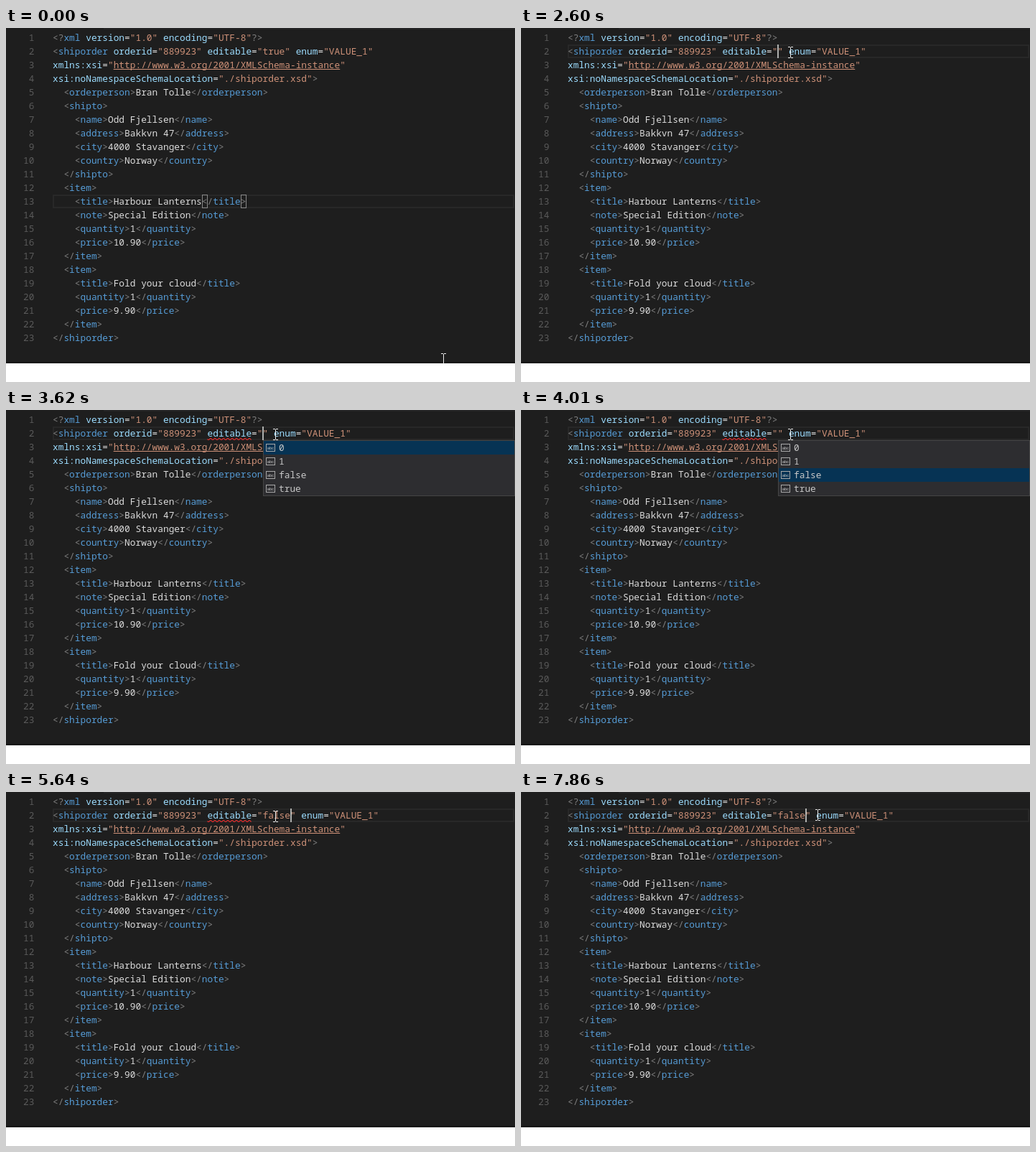
Recreate the animation shown at these times as an HTML page with a canvas. Size 709 px wide and 493 px high, loop 8 s.

```html
<!DOCTYPE html>
<html lang="en">
<head>
<meta charset="utf-8">
<style>
  html, body { margin: 0; width: 100%; height: 100%; overflow: hidden; background: #fff; }
  canvas { display: block; }
</style>
</head>
<body>
<canvas id="stage" width="709" height="493"></canvas>
<script>
const ctx = document.getElementById("stage").getContext("2d");
const WIDTH = 709, HEIGHT = 493, EDITOR_HEIGHT = 467;
const LOOP = 8000, TICK = 201.5, BLINK = 500;
const LEFT = 65, CHAR = 7.697, LINE = 19, VALUE_COL = 38;
const FONT = '500 12.83px "Noto Sans Mono", "DejaVu Sans Mono", monospace';
const COLORS = {
  string: "#ce9178", punct: "#808080", tag: "#569cd6",
  attr: "#9cdcfe", plain: "#dcdcdc"
};
const TOKEN = /(?<string>"[^"]*")|(?<punct><[\/?]?|\??>)|(?<tag>(?<=<[\/?]?)\w+)|(?<attr>[\w:]+(?==))|(?<plain> +|=|[^<>]+)/g;
const OPTIONS = ["0", "1", "false", "true"];

// Times of the user's actions; each one restarts the caret blink.
const CLICK = 1300, SELECT = 1650, DELETE = 2480, ACCEPT = 4516;
const POPUP = 2700, BROWSE = 3500, VALIDATED = 6100;

const source = value => `<?xml version="1.0" encoding="UTF-8"?>
<shiporder orderid="889923" editable="${value}" enum="VALUE_1"
xmlns:xsi="http://www.w3.org/2001/XMLSchema-instance"
xsi:noNamespaceSchemaLocation="./shiporder.xsd">
  <orderperson>Bran Tolle</orderperson>
  <shipto>
    <name>Odd Fjellsen</name>
    <address>Bakkvn 47</address>
    <city>4000 Stavanger</city>
    <country>Norway</country>
  </shipto>
  <item>
    <title>Harbour Lanterns</title>
    <note>Special Edition</note>
    <quantity>1</quantity>
    <price>10.90</price>
  </item>
  <item>
    <title>Fold your cloud</title>
    <quantity>1</quantity>
    <price>9.90</price>
  </item>
</shiporder>`.split("\n");

const colX = col => LEFT + col * CHAR;
const lineY = line => 4 + (line - 1) * LINE;
const clamp = (x, low = 0, high = 1) => Math.min(high, Math.max(low, x));
const mix = (a, b, p) => a + (b - a) * p;
const smooth = p => p * p * (3 - 2 * p);
const backOut = p => 1 + 2.7 * (p - 1) ** 3 + 1.7 * (p - 1) ** 2;

function rect(color, x, y, w, h) {
  ctx.fillStyle = color;
  ctx.fillRect(x, y, w, h);
}

function frame(color, x, y, w, h, weight = 1) {
  ctx.strokeStyle = color;
  ctx.lineWidth = weight;
  ctx.strokeRect(x + weight / 2, y + weight / 2, w - weight, h - weight);
}

function text(string, x, y, color, align = "left", font = FONT) {
  ctx.font = font;
  ctx.textAlign = align;
  ctx.fillStyle = color;
  ctx.fillText(string, x, y);
}

function drawLine(content, index) {
  const line = index + 1, base = lineY(line) + 14;
  text(line, 39.5, base, "#5a5a5a", "right");
  for (const match of content.matchAll(TOKEN)) {
    const kind = Object.keys(COLORS).find(key => match.groups[key] !== undefined);
    const token = match[0], x = colX(match.index);
    text(token, x, base, COLORS[kind]);
    if (token.startsWith('"http'))
      rect(COLORS.string, x + CHAR, base + 1, (token.length - 2) * CHAR, 1);
  }
}

function drawSquiggle() {
  ctx.beginPath();
  for (let x = 0; x <= 8 * CHAR; x++)
    ctx.lineTo(colX(28) + x, 40.5 + 1.2 * Math.sin(x * Math.PI / 3));
  ctx.strokeStyle = "#e02a2a";
  ctx.lineWidth = 1.1;
  ctx.stroke();
}

function drawPopup(selected) {
  const x = 358, top = lineY(3), width = WIDTH - x;
  rect("#2d2d30", x, top, width, OPTIONS.length * LINE + 2);
  frame("#454545", x, top, width, OPTIONS.length * LINE + 2);
  rect("#063354", x + 1, top + 1 + selected * LINE, width - 2, LINE);
  OPTIONS.forEach((label, i) => {
    const y = top + 1 + i * LINE;
    frame("#a8a8a8", x + 4, y + 4, 13, 11);
    text("abc", x + 10.5, y + 12, "#c5c5c5", "center", '6px "Liberation Sans", sans-serif');
    text(label, x + 22, y + 14, "#c8c8c8");
  });
}

function drawCaret(t) {
  const [time, length] = t >= ACCEPT ? [ACCEPT, 5] : t >= DELETE ? [DELETE, 0]
    : t >= SELECT ? [SELECT, 4] : [CLICK, 2];
  if (t >= CLICK && (t - time) % (2 * BLINK) < BLINK)
    rect("#aeafad", Math.round(colX(VALUE_COL + length)), lineY(2), 2, LINE);
}

// The pointer swings up to the value, rests, then wanders right and back.
function drawMouse(t) {
  const arrive = clamp(t / 1180), leave = clamp((t - 6420) / 1410);
  const swing = Math.sin(Math.PI * leave) ** 1.4;
  const x = Math.round(mix(609, 375, backOut(arrive)) + 38 * leave + 67 * swing);
  const y = Math.round(mix(461, 34, smooth(arrive)) - 2 * leave + 2 * swing);
  rect("#eee", x, y - 7, 1, 14);
  for (const edge of [y - 8, y + 7]) {
    rect("#eee", x - 3, edge, 3, 1);
    rect("#eee", x + 1, edge, 3, 1);
  }
}

function draw(t) {
  rect("#fff", 0, 0, WIDTH, HEIGHT);
  rect("#1e1e1e", 0, 0, WIDTH, EDITOR_HEIGHT);
  rect("#252526", 136, 0, WIDTH - 136, 2);
  rect("#191919", 0, EDITOR_HEIGHT - 3, WIDTH, 3);

  frame("#282828", LEFT, lineY(t < CLICK ? 13 : 2), 643, LINE, 2);
  if (t >= SELECT && t < DELETE)
    rect("#264f78", colX(VALUE_COL), lineY(2), 4 * CHAR, LINE);

  source(t < DELETE ? "true" : t < ACCEPT ? "" : "false").forEach(drawLine);
  if (t < CLICK + 200)
    for (const col of [27, 34]) frame("#888", Math.round(colX(col)), lineY(13), 8, LINE);

  if (t >= BROWSE && t < VALIDATED) drawSquiggle();
  drawCaret(t);
  if (t >= POPUP && t < ACCEPT)
    drawPopup(clamp(Math.floor((t - BROWSE) / 200), 0, 2));
  drawMouse(t);
}

// The screen advances in even ticks.
const start = performance.now();
function tick() {
  const t = (performance.now() - start) % LOOP;
  draw(Math.floor((t + 25) / TICK) * TICK - 25);
  requestAnimationFrame(tick);
}
tick();
</script>
</body>
</html>
```
